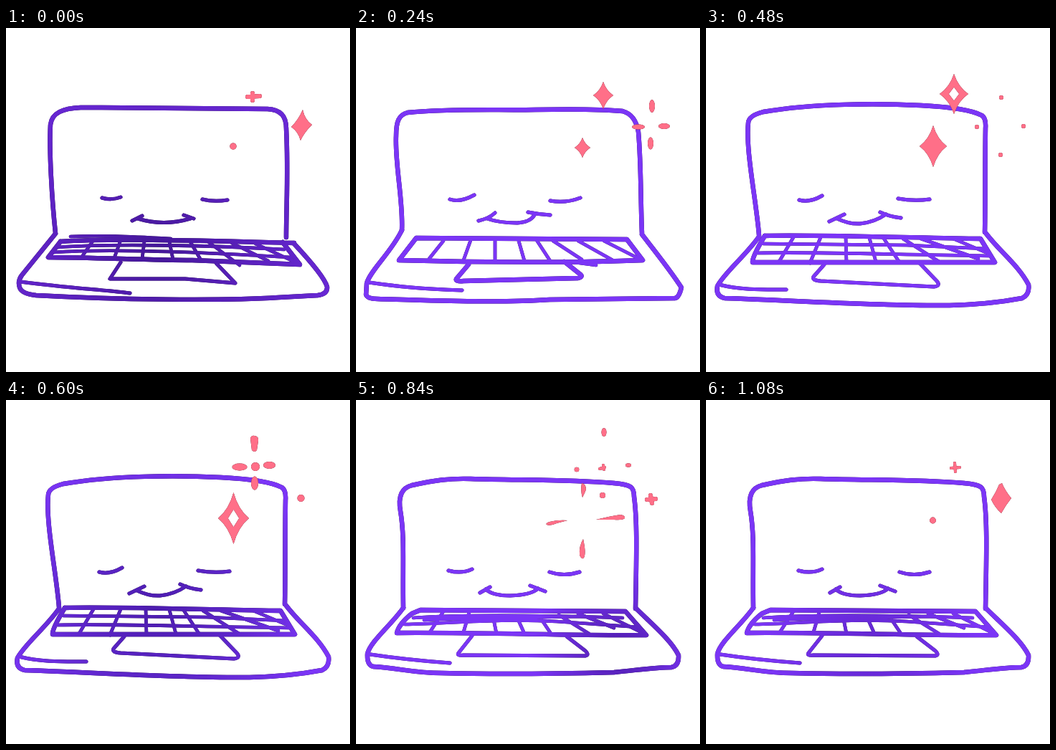
An HTML page without scripts that plays this animation: 480x480 px, repeating every 1.2 s.

```html
<!DOCTYPE html>
<html lang="en">
<head>
<meta charset="utf-8">
<title>Sleepy laptop</title>
<style>
html, body { margin: 0; width: 100%; height: 100%; overflow: hidden; background: #fff; }
svg { display: block; width: 100vw; height: 100vh; }
.pose { visibility: hidden; animation: show 1.2s calc(var(--i) * 120ms - 1200ms) step-end infinite; }
@keyframes show {
  0% { visibility: visible; }
  10%, 100% { visibility: hidden; }
}
.ink { fill: none; stroke-width: 6.4; stroke-linecap: round; stroke-linejoin: round; filter: drop-shadow(0 0 .4px #1a0838); }
.face, .thin { stroke-width: 5; }
.keys { stroke-width: 4.6; }
.glow { fill: #ff6f88; stroke: #ff6f88; stroke-width: 0; stroke-linecap: round; filter: drop-shadow(0 0 .4px #3a0812); }
.cross { stroke-width: 6; }
.small { stroke-width: 4; }
</style>
</head>
<body>
<svg viewBox="0 0 480 480">
<defs>
  <radialGradient id="dusk" gradientUnits="userSpaceOnUse" cx="210" cy="310" r="260">
    <stop offset="0" stop-color="#441798"/><stop offset=".5" stop-color="#5a20bd"/><stop offset="1" stop-color="#6928d6"/>
  </radialGradient>
  <radialGradient id="mid" gradientUnits="userSpaceOnUse" cx="210" cy="290" r="230">
    <stop offset="0" stop-color="#4c1cae"/><stop offset=".45" stop-color="#5c25c8"/><stop offset="1" stop-color="#7b35f6"/>
  </radialGradient>
  <radialGradient id="left" gradientUnits="userSpaceOnUse" cx="70" cy="270" r="170">
    <stop offset="0" stop-color="#5722bd"/><stop offset="1" stop-color="#7b35f6"/>
  </radialGradient>
  <radialGradient id="right" gradientUnits="userSpaceOnUse" cx="365" cy="350" r="120">
    <stop offset="0" stop-color="#4e1cac"/><stop offset="1" stop-color="#7b35f6"/>
  </radialGradient>
  <radialGradient id="low" gradientUnits="userSpaceOnUse" cx="230" cy="345" r="150">
    <stop offset="0" stop-color="#6226cf"/><stop offset="1" stop-color="#7b35f6"/>
  </radialGradient>

  <g id="a">
    <path d="M69 286C64 240 60 170 62 135C64 118 80 112 104 111C200 111 300 113 365 113C385 114 391 125 391 140C394 200 391 250 391 292"/>
    <path d="M69 287L22 345Q16 353 19 362Q22 371 42 373C150 379 300 381 380 376L435 373Q449 371 448 361Q444 346 402 301"/>
    <path class="thin" d="M20 354C80 362 130 365 173 370"/>
    <path d="M76 298L59 320C120 320 200 324 260 324L410 330L386 299M76 298C150 293 280 297 402 300"/>
    <g class="keys">
      <path d="M90 291C130 289 170 291 230 294M72 306C150 300 300 304 388 309M66 313C150 307 280 313 398 320"/>
      <path d="M122 296L106 319M160 296L151 321M193 298L190 322M228 298L233 323M257 298L272 324M283 299L326 331M315 300L366 325M348 301L402 326"/>
    </g>
    <path class="thin" d="M160 327L145 350L250 350L320 356L293 328"/>
    <path class="face" d="M134 237Q147 241 160 236M274 239Q290 243 309 240M176 269L190 262M184 266Q220 277 257 266M248 261L262 266"/>
  </g>

  <g id="b">
    <path d="M66 290C65 230 68 190 62 155C58 132 66 122 78 119C110 112 130 109 160 110C230 112 300 111 360 116C385 118 388 122 388 135C393 170 391 230 390 291"/>
    <path d="M66 290C50 313 20 337 16 354Q15 370 24 372C60 374 80 381 120 381C200 383 280 382 360 380C400 376 420 373 440 373Q451 371 450 356C440 335 410 310 391 291"/>
    <path class="thin" d="M20 355C60 361 90 364 131 367"/>
    <path d="M90 293L376 295L405 328C300 329 180 324 57 325Q60 312 78 298Z"/>
    <g class="keys">
      <path d="M80 304C150 299 250 300 372 304M68 313C130 312 200 304 280 309L395 317M95 307C150 304 220 304 310 302"/>
      <path d="M122 295L103 324M158 296L150 324M192 306L196 326M226 306L235 326M260 308L272 326M283 300L325 326M310 298L360 318M345 298L400 325"/>
    </g>
    <path class="thin" d="M162 329L143 353Q140 357 150 356L320 357Q326 356 320 350L294 330"/>
    <path class="face" d="M129 238Q147 243 162 236M270 240Q290 247 312 240M173 269L187 261M181 264Q190 273 215 273Q245 272 254 263M243 259L264 267"/>
  </g>

  <g id="c">
    <path d="M64 282C66 240 54 190 56 150C56 130 60 121 72 118C130 112 200 115 250 114C300 113 340 113 372 116Q390 121 394 145C398 190 397 240 399 286"/>
    <path d="M64 282C50 312 20 338 15 356L14 372Q16 378 30 378C100 380 200 384 270 379L445 377Q451 376 454 362C440 340 420 315 399 288"/>
    <path class="thin" d="M18 355C60 361 90 364 148 366"/>
    <path d="M84 293L378 295L400 324C330 327 200 328 60 324Z"/>
    <path class="keys" d="M122 297L102 322M160 296L150 324M194 295L194 325M227 297L235 325M252 296L271 325M275 297L315 323M310 297L360 325M346 297L397 323M290 325L335 331"/>
    <path d="M157 330L140 350Q138 354 150 353L310 349Q318 347 312 343L292 327"/>
    <path class="face" d="M131 239Q145 244 165 233M271 241Q292 245 313 237M171 269Q185 266 194 258M183 266Q200 272 225 272Q243 271 249 261M240 257Q255 260 271 261"/>
  </g>

  <g id="d">
    <path d="M74 289C70 240 55 170 59 132Q60 122 80 117C150 105 240 105 300 108C340 110 370 114 385 122Q391 126 390 140C389 200 390 240 389 285"/>
    <path d="M74 291C55 318 25 342 16 360Q13 374 26 377C120 380 240 388 340 387C380 386 420 381 441 377Q452 372 450 358C435 330 410 312 391 287"/>
    <path class="thin" d="M18 358C50 366 80 365 112 365"/>
    <path d="M82 290C150 288 300 293 383 294L403 327L65 327Q64 320 82 290"/>
    <g class="keys">
      <path d="M80 301L280 303L390 308M72 314C150 312 250 316 396 318"/>
      <path d="M122 292L102 326M160 292L145 328M195 292L196 327M228 293L237 326M247 292L270 327M275 294L325 326M300 294L380 322M345 294L395 315"/>
    </g>
    <path class="thin" d="M165 330L150 347Q147 352 160 353L318 361Q328 360 322 353L297 327"/>
    <path class="face" d="M130 240Q145 244 162 234M268 238Q290 242 312 239M172 270L193 260M183 266Q200 274 215 273Q235 271 251 260M243 257Q255 263 272 265"/>
  </g>

  <g id="e">
    <path d="M69 286C71 240 63 190 63 135Q63 123 80 120C130 106 170 103 220 104C290 105 340 112 373 114"/>
    <path stroke-width="8.5" d="M389 118C396 140 398 180 398 200C396 240 388 260 390 286"/>
    <path d="M69 288C50 315 25 340 14 358Q13 373 22 378C100 380 160 389 240 390C300 389 380 380 440 378Q448 374 449 356C435 335 410 312 391 289"/>
    <path class="thin" d="M18 360C40 366 60 365 88 367"/>
    <path d="M72 291C150 294 280 293 376 295L395 321Q395 325 380 325L70 323Q62 322 64 315L78 292"/>
    <g class="keys">
      <path d="M78 301C150 298 250 299 375 304M72 311L385 314"/>
      <path d="M122 296L110 322M150 294L150 322M192 296L197 322M225 297L235 322M255 296L277 333M275 297L325 322M315 298L385 320M345 298L372 302"/>
    </g>
    <path class="thin" d="M165 330L148 352Q147 357 160 356L315 358Q323 356 318 350L297 330"/>
    <path class="face" d="M132 241Q150 239 165 233M265 239Q290 245 313 236M171 271Q185 266 195 258M183 266Q195 271 215 271Q237 269 252 260M239 255Q250 260 274 262"/>
  </g>

  <path id="gem" d="M0-1Q.3-.35 1 0Q.3.35 0 1Q-.3.35-1 0Q-.3-.35 0-1"/>
  <path id="ring" fill-rule="evenodd" d="M0-1Q.3-.35 1 0Q.3.35 0 1Q-.3.35-1 0Q-.3-.35 0-1M0-.34L.36 0L0 .34L-.36 0Z"/>
</defs>

<g class="pose" style="--i:0">
  <use href="#a" class="ink" stroke="url(#dusk)"/>
  <g class="glow">
    <path d="M414 114Q417 128 427 135Q416 146 411 157Q408 145 398 138Q408 128 414 114"/>
    <path class="cross" d="M337 96L354 95M344 91V101"/>
    <circle cx="317" cy="165" r="4.6"/>
  </g>
</g>

<g class="pose" style="--i:1">
  <use href="#b" class="ink" stroke="#7b35f6"/>
  <g class="glow">
    <ellipse cx="413" cy="115.500" rx="4.500" ry="8.500"/><ellipse cx="399" cy="137" rx="6" ry="4"/>
    <circle cx="411" cy="137" r="5"/>
    <ellipse cx="425" cy="136.500" rx="6.500" ry="4.500"/><ellipse cx="411" cy="154.500" rx="4.500" ry="7"/>
    <path class="cross" d="M333 96L356 97M343 86L344 106"/>
    <path class="small" d="M309 167L324 167M316 160L317 173"/>
  </g>
</g>

<g class="pose" style="--i:2">
  <use href="#c" class="ink" stroke="#7b35f6"/>
  <g class="glow">
    <ellipse cx="413" cy="109" rx="4" ry="9"/><ellipse cx="394" cy="138" rx="9" ry="3.500"/>
    <ellipse cx="430" cy="137" rx="8" ry="4"/><ellipse cx="411" cy="161" rx="4" ry="8.500"/>
    <use href="#gem" transform="translate(345 94) scale(14 19)"/>
    <use href="#gem" transform="translate(316 167) scale(11 14)"/>
  </g>
</g>

<g class="pose" style="--i:3">
  <use href="#c" class="ink" stroke="#7b35f6"/>
  <g class="glow">
    <path class="small" d="M412 99L413 113M380 137L398 139M427 137L440 137M410 158L411 173"/>
    <ellipse cx="437" cy="137" rx="6" ry="3.800"/><ellipse cx="411" cy="171" rx="3.800" ry="5"/>
    <use href="#ring" transform="translate(345 92) scale(17 23)"/>
    <use href="#gem" transform="translate(316 167) scale(16 21)"/>
  </g>
</g>

<g class="pose" style="--i:4">
  <use href="#d" class="ink" stroke="#7b35f6"/>
  <g class="glow">
    <circle cx="412" cy="97" r="3"/><circle cx="378" cy="138" r="3"/>
    <circle cx="443" cy="137" r="3"/><circle cx="411" cy="177" r="3"/>
    <use href="#ring" transform="translate(346 92) scale(20 28)"/>
    <use href="#gem" transform="translate(317 165) scale(19 29)"/>
  </g>
</g>

<g class="pose" style="--i:5">
  <use href="#d" class="ink" stroke="url(#mid)"/>
  <g class="glow">
    <circle cx="411.500" cy="137" r="5"/>
    <path d="M341 54Q342 49 347 50Q353 51 352 57L350 70Q347 74 343 70Z"/>
    <ellipse cx="326" cy="93.500" rx="10.500" ry="5"/><circle cx="348" cy="93" r="6"/>
    <ellipse cx="367.500" cy="91" rx="8.500" ry="5"/><ellipse cx="347" cy="116" rx="5" ry="9.500"/>
    <use href="#ring" transform="translate(317.500 165) scale(21.500 36)"/>
  </g>
</g>

<g class="pose" style="--i:6">
  <use href="#e" class="ink" stroke="url(#left)"/>
  <g class="glow">
    <path class="cross" d="M405 138L417 138M411 131L412 143"/>
    <circle cx="347" cy="50" r="5"/><circle cx="316" cy="97" r="5.300"/><circle cx="344.500" cy="92" r="3"/>
    <circle cx="375.500" cy="91" r="5"/><circle cx="345" cy="126" r="5"/>
    <ellipse cx="319.500" cy="137" rx="6" ry="15"/><circle cx="317" cy="170" r="5.500"/>
    <path d="M304 169Q292 162 283 164Q276 167 277 172Q280 179 290 177Q299 175 304 169"/>
    <path d="M329 170Q341 162 352 159Q361 159 361 166Q359 173 350 172Q340 170 329 170"/>
    <path d="M316 185Q318 195 323 202Q323 209 317 210Q310 208 311 201Q315 194 316 185"/>
  </g>
</g>

<g class="pose" style="--i:7">
  <use href="#b" class="ink" stroke="url(#right)"/>
  <g class="glow">
    <path class="cross" d="M406 139L418 138M411 133L413 144"/>
    <ellipse cx="346" cy="45" rx="3.500" ry="6"/><circle cx="308" cy="97" r="3.300"/>
    <path class="small" d="M340 96L347 94M345 91L346 97"/>
    <ellipse cx="380" cy="91" rx="4" ry="2.700"/><circle cx="344" cy="133" r="4"/>
    <path d="M315 116Q321 117 321 125Q319 130 316 136Q313 126 315 116"/>
    <path d="M295 168Q282 167 270 170Q264 172 266 174Q271 176 280 172Z"/>
    <path d="M335 167Q355 162 369 160Q376 161 375 165Q372 168 360 167Z"/>
    <path d="M317 194Q311 204 312 216Q314 222 317 221Q322 217 317 194"/>
  </g>
</g>

<g class="pose" style="--i:8">
  <use href="#a" class="ink" stroke="url(#mid)"/>
  <g class="glow">
    <use href="#gem" transform="translate(412 137) scale(13 16)"/>
    <path class="small" d="M339 95L351 94M345 89L345 100"/>
    <circle cx="317" cy="114" r="2.500"/><circle cx="262" cy="173" r="2.500"/>
    <circle cx="380" cy="163" r="2.500"/><circle cx="316" cy="224" r="2.500"/>
  </g>
</g>

<g class="pose" style="--i:9">
  <use href="#b" class="ink" stroke="url(#low)"/>
  <g class="glow">
    <path d="M413 116Q417 126 426 137Q418 147 412 158Q403 150 398 139Q405 128 409 118Z"/>
    <path class="small" d="M342 95L354 94M347 88L348 100"/>
    <circle cx="316.500" cy="168" r="4.400"/>
  </g>
</g>
</svg>
</body>
</html>
```
